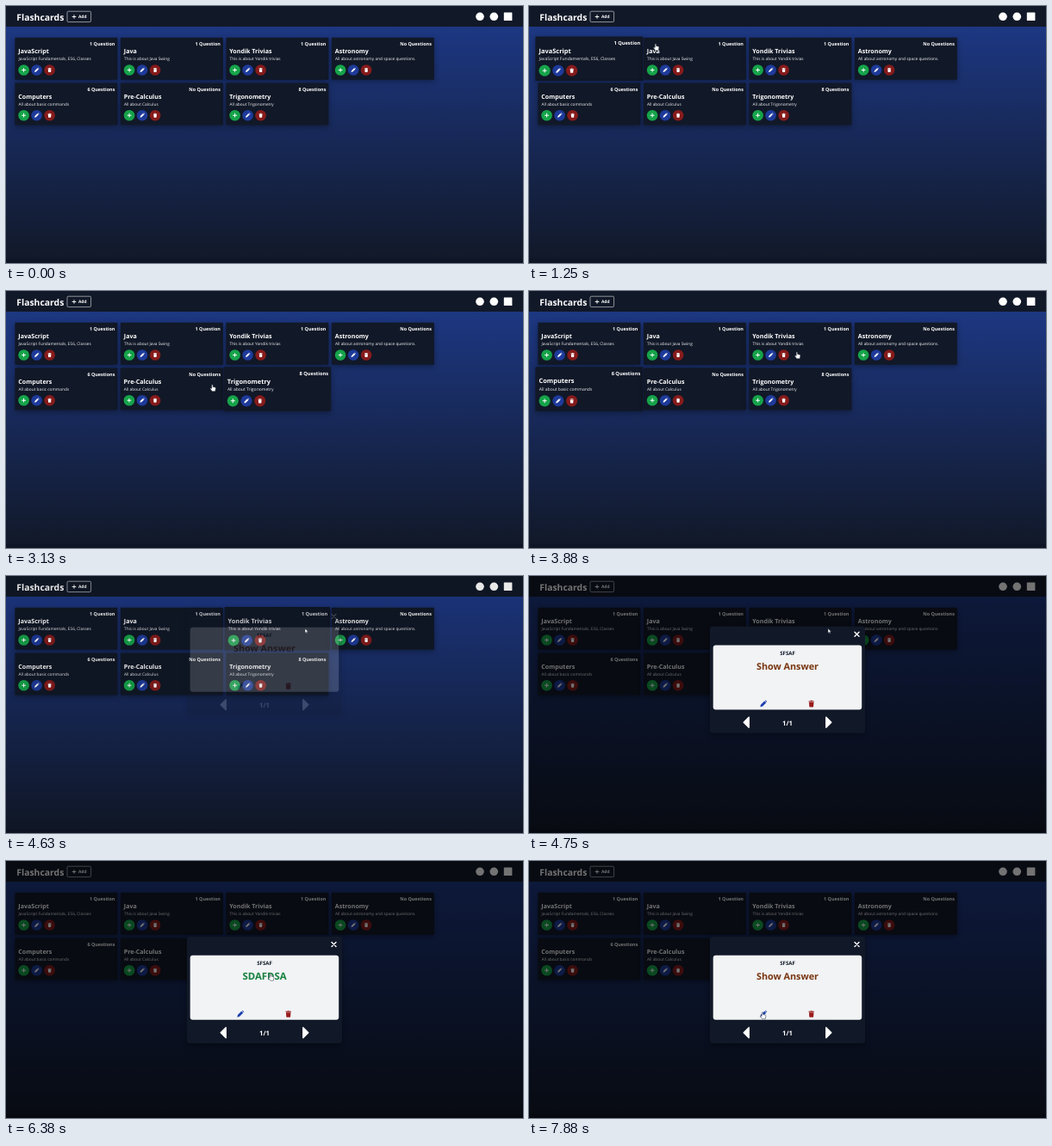
These frames come from a looping animation (600 px wide and 299 px high, 8000 ms). An HTML page:

```html
<!DOCTYPE html>
<html lang="en">
<head>
<meta charset="utf-8">
<title>Flashcards</title>
<style>
  html, body { margin: 0; width: 100%; height: 100%; overflow: hidden; background: #111827; }
  svg { display: block; width: 100vw; height: 100vh; }
  text { font-family: "Open Sans", "Noto Sans", sans-serif; text-rendering: geometricPrecision; white-space: pre; }
  .shade { filter: drop-shadow(0 2px 3px rgba(0, 0, 0, .35)); }
</style>
</head>
<body>
<svg id="stage" viewBox="0 0 600 299" preserveAspectRatio="none">
  <defs>
    <linearGradient id="sky" x1="0" y1="0" x2="0" y2="1">
      <stop offset="0" stop-color="#1e3a8a"/>
      <stop offset="1" stop-color="#111827"/>
    </linearGradient>
  </defs>
</svg>
<script>
const LOOP = 8000, STEP = 125;
const stage = document.getElementById('stage');
const DARK = '#111827';

const ICON = {
  pencil: 'M-4 4l.7-2.9 4.6-4.6 2.2 2.2-4.6 4.6zM1.9-4.1Q2.6-4.7 3.3-4.1L4.1-3.3Q4.7-2.6 4.1-1.9z',
  trash: 'M-3.5-3.4h2l.5-.8h2l.5.8h2v1h-7zM-3-1.9h6l-.4 5.3q0 .8-.8.8h-3.6q-.8 0-.8-.8z',
  plus: 'M-3-.6h2.4V-3H.6v2.4H3V.6H.6V3H-.6V.6H-3z',
  hand: 'M-1.3-3.7q.8-.8 1.4 0v2.2l2.5.6q.9.3.8 1.2l-.6 3.4h-3.6l-2.2-3q-.2-.9.8-.7l.9.6z',
  arrow: 'M-1.5-2.8v5.2l1.3-1.2.8 1.8.9-.4-.8-1.8h1.7z'
};

function add(parent, tag, attrs) {
  const el = document.createElementNS('http://www.w3.org/2000/svg', tag);
  for (const key in attrs) el.setAttribute(key, attrs[key]);
  return parent.appendChild(el);
}
const rect = (p, x, y, width, height, fill, more) =>
  add(p, 'rect', { x, y, width, height, fill, ...more });

function label(p, str, x, y, size, fill, weight = 700, anchor = 'start') {
  const el = add(p, 'text', { x, y, fill, 'font-size': size, 'font-weight': weight, 'text-anchor': anchor });
  el.textContent = str;
  return el;
}
const icon = (p, name, x, y, scale, fill) =>
  add(p, 'path', { d: ICON[name], fill, transform: `translate(${x} ${y}) scale(${scale})` });

// Page and header
rect(stage, 0, 0, 600, 299, 'url(#sky)');
rect(stage, 0, 294.5, 600, 4.5, '#0d1322', { opacity: .6 });
rect(stage, 0, 0, 600, 24, DARK);
label(stage, 'Flashcards', 12.3, 16.8, 10.4, '#fff');
rect(stage, 71, 6.2, 27.6, 12.4, 'none', { rx: 1.4, stroke: '#e5e7eb', 'stroke-width': .6 });
icon(stage, 'plus', 79, 12.5, .75, '#fff');
label(stage, 'Add', 84, 14.4, 4.9, '#fff');
add(stage, 'circle', { cx: 550, cy: 12.3, r: 4.8, fill: '#fff' });
add(stage, 'circle', { cx: 566.3, cy: 12.3, r: 4.8, fill: '#fff' });
rect(stage, 577.8, 7.5, 9.6, 9.6, '#fff', { rx: .6 });

// Cards: title, description, count, hover spans in ms
const cards = [
  ['JavaScript', 'JavaScript Fundamentals, ES6, Classes', '1 Question', [[850, 1250]]],
  ['Java', 'This is about Java Swing', '1 Question', [[1250, 1800]]],
  ['Yondik Trivias', 'This is about Yondik trivias', '1 Question', [[1800, 2375], [3875, 4560]]],
  ['Astronomy', 'All about astronomy and space questions.', 'No Questions', [[2375, 2700]]],
  ['Computers', 'All about basic commands', '6 Questions', [[3450, 3875]]],
  ['Pre-Calculus', 'All about Calculus', 'No Questions', [[3100, 3450]]],
  ['Trigonometry', 'All about Trigonometry', '8 Questions', [[2700, 3100]]]
].map(([title, text, count, hovers], i) => {
  const x = 10.4 + (i % 4) * 122.5, y = i < 4 ? 36.8 : 89.5;
  const g = add(stage, 'g', {});
  rect(g, 0, 0, 119, 49, DARK, { rx: .8, class: 'shade' });
  label(g, count, 116, 9.2, 5.45, '#fff', 700, 'end');
  label(g, title, 3.9, 18.3, 7.1, '#fff');
  label(g, text, 4.1, 26.1, 4.8, '#f3f4f6', 400);
  [['plus', '#16a34a', .78], ['pencil', '#1e3a9a', .64], ['trash', '#861b1b', .6]].forEach(([name, fill, s], k) => {
    const cx = 10.2 + k * 15;
    add(g, 'circle', { cx, cy: 37.7, r: 6.3, fill });
    icon(g, name, cx, 37.7, s, '#fff');
  });
  return { g, x, y, hovers };
});

// Dialog
const backdrop = rect(stage, 0, 0, 600, 299, '#000');
const modal = add(stage, 'g', {});
rect(modal, 210, 88, 180, 124, DARK, { rx: 3, class: 'shade' });
add(modal, 'path', { d: 'M378 94.5l5 5m0-5l-5 5', stroke: '#fff', 'stroke-width': 1.4, 'stroke-linecap': 'round' });
rect(modal, 213.7, 109.8, 172.5, 75, '#f1f3f5', { rx: 3 });
label(modal, 'SFSAF', 300, 120.9, 6.1, '#111827', 700, 'middle');
const prompt = label(modal, 'Show Answer', 300, 138.2, 10.8, '#78350f', 700, 'middle');
const answer = label(modal, 'SDAFDSA', 300, 138.2, 11.4, '#15803d', 700, 'middle');
icon(modal, 'pencil', 272, 178, .92, '#1e40af');
icon(modal, 'trash', 327.7, 178, .92, '#991b1b');
label(modal, '1/1', 300, 203, 7.6, '#fff', 700, 'middle');
for (const s of [-1, 1])
  add(modal, 'path', {
    d: 'M0-6v12l6-6z', fill: '#fff', stroke: '#fff', 'stroke-width': 1.4, 'stroke-linejoin': 'round',
    transform: `translate(${300 + s * 44.8} 199.7) scale(${s} 1)`
  });

const cursor = add(stage, 'path', { fill: '#fff', stroke: '#1f2937', 'stroke-width': .5 });
const track = [
  [875, 70, 80], [1000, 90, 62], [1125, 124, 51], [1250, 147.5, 48], [1625, 200, 58],
  [2000, 290, 66], [2375, 402, 71], [2500, 428, 75], [2875, 340, 108], [3125, 240, 113],
  [3375, 140, 115], [3500, 80, 111], [3625, 90, 101], [3750, 200, 88], [3875, 311.5, 75],
  [4250, 340, 66], [4500, 348.5, 64], [5500, 348.5, 64], [6125, 307.5, 135.5],
  [7125, 307.5, 135.5], [7500, 329, 179], [7875, 271.5, 180]
];

const clamp = v => Math.min(1, Math.max(0, v));
const smooth = v => v * v * (3 - 2 * v);
const show = (el, on) => el.setAttribute('visibility', on ? 'inherit' : 'hidden');

function trackAt(t) {
  const i = track.findIndex(k => k[0] > t);
  if (i < 0) return track[track.length - 1].slice(1);
  if (!i) return track[0].slice(1);
  const [t0, x0, y0] = track[i - 1], [t1, x1, y1] = track[i];
  const f = (t - t0) / (t1 - t0);
  return [x0 + (x1 - x0) * f, y0 + (y1 - y0) * f];
}

function draw(t) {
  for (const { g, x, y, hovers } of cards) {
    const grow = hovers.reduce((sum, [a, b]) =>
      sum + smooth(clamp((t - a) / 150)) - smooth(clamp((t - b) / 150)), 0);
    g.setAttribute('transform',
      `translate(${x + 59.5} ${y + 24.5}) scale(${1 + .05 * grow}) translate(-59.5 -24.5)`);
  }

  const fade = clamp((t - 4600) / 150);
  const left = 1 - clamp((t - 4665) / 300);
  backdrop.setAttribute('opacity', .55 * fade);
  modal.setAttribute('opacity', fade);
  modal.setAttribute('transform', `translate(0 ${-50 * left ** 1.6})`);

  const flipped = t >= 6125 && t < 6750;
  show(prompt, !flipped);
  show(answer, flipped);

  const [x, y] = trackAt(t);
  show(cursor, t >= 875);
  cursor.setAttribute('d', t >= 4625 && y < 128 ? ICON.arrow : ICON.hand);
  cursor.setAttribute('transform', `translate(${x} ${y})`);
}

const start = performance.now();
function tick() {
  const t = (performance.now() - start) % LOOP;
  draw(Math.floor(t / STEP) * STEP);
  requestAnimationFrame(tick);
}
tick();
</script>
</body>
</html>
```
